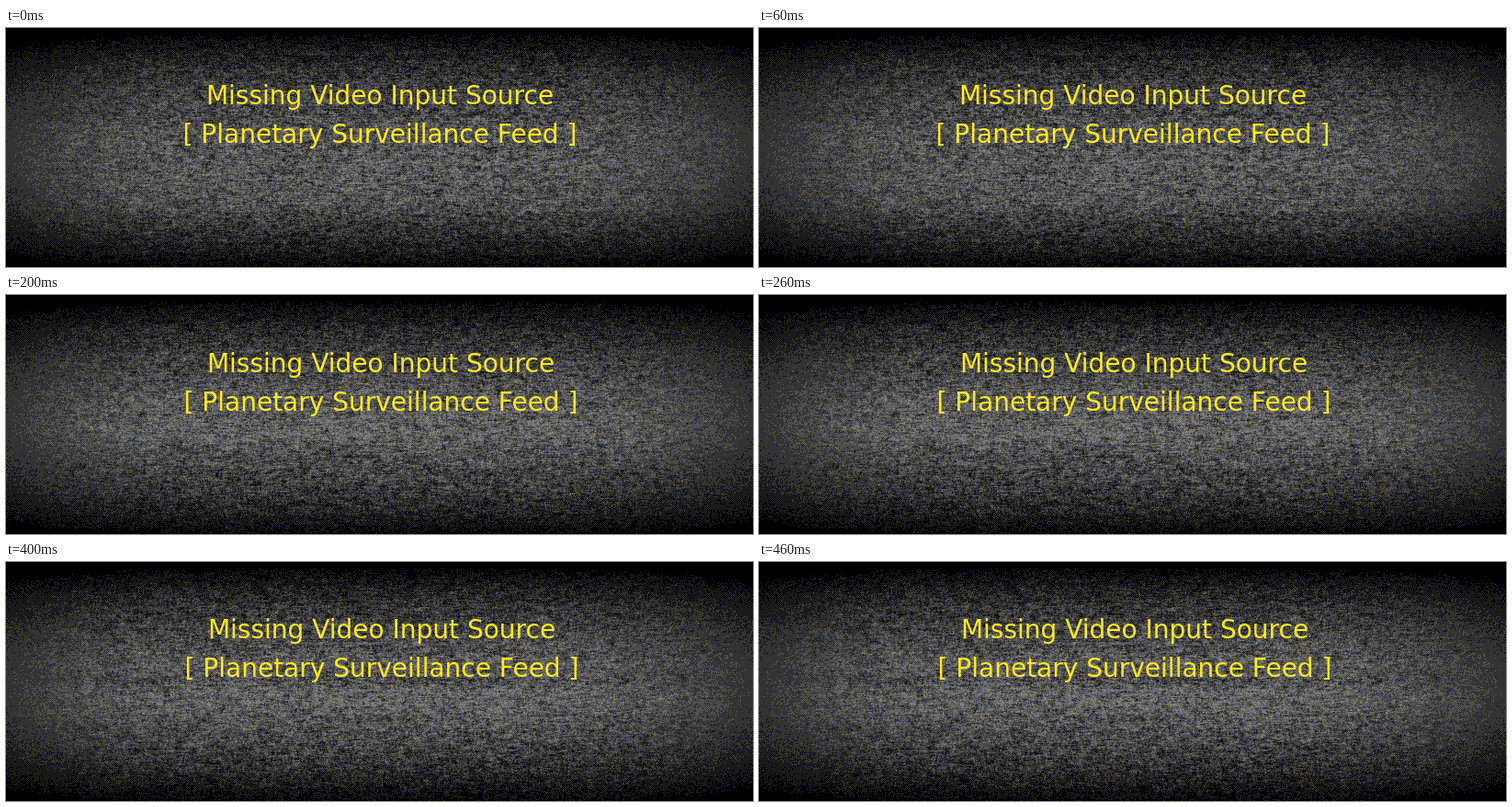
These frames come from a looping animation (813x260 px, 0.5 s). An HTML page with a canvas:

```html
<!DOCTYPE html>
<html lang="en">
<head>
<meta charset="utf-8">
<title>Missing Video Input Source</title>
<style>
  html, body { margin: 0; width: 100%; height: 100%; overflow: hidden; background: #000; }
  .stage { position: relative; width: 813px; height: 260px; overflow: hidden; }
  canvas { position: absolute; left: 0; top: 0; animation: roll .5s steps(5) infinite; }
  svg { position: absolute; left: 0; top: 0; animation: jitter .5s step-end infinite; }
  text {
    font: 400 28px "DejaVu Sans", sans-serif;
    text-anchor: middle;
    fill: #ffe91f;
  }
  @keyframes roll { to { transform: translateY(-100%); } }
  @keyframes jitter {
    0%   { transform: translate(0, 0); }
    20%  { transform: translate(-1px, 1px); }
    40%  { transform: translate(1px, 1px); }
    60%  { transform: translate(-1px, 0); }
    80%  { transform: translate(2px, 0); }
  }
</style>
</head>
<body>
<div class="stage">
  <canvas id="static" width="813" height="1300"></canvas>
  <svg width="813" height="260">
    <text x="407" y="83">Missing Video Input Source</text>
    <text x="407" y="125">[ Planetary Surveillance Feed ]</text>
  </svg>
</div>
<script>
const W = 813, H = 260, STEP = 51;
const ctx = document.getElementById('static').getContext('2d');

// Heights of the bright and the dark band in each picture
const bands = [
  { glow: 185, dim: 97 },
  { glow: 150, dim: 180 },
  { glow: 145, dim: 88 },
  { glow: 165, dim: 40 },
  { glow: 156, dim: 128 }
];

function seeded(seed) {
  return () => {
    seed = (seed + 0x6D2B79F5) | 0;
    let t = Math.imul(seed ^ (seed >>> 15), 1 | seed);
    t = (t + Math.imul(t ^ (t >>> 7), 61 | t)) ^ t;
    return ((t ^ (t >>> 14)) >>> 0) / 4294967296;
  };
}

const bump = (y, mid, width) => Math.exp(-(((y - mid) / width) ** 2));

// Television static: streaks along each row under a soft vignette
function drawStatic({ glow, dim }, index) {
  const rand = seeded(977 * (index + 1));
  const img = ctx.createImageData(W, H);
  const blots = new Float32Array(W);
  const level = (v, grain) => Math.floor(v / STEP + grain) * STEP;
  let row = 0, p = 0;

  for (let y = 0; y < H; y++) {
    const w2 = ((y - 134) / 128) ** 2;
    row = row * 0.75 + (rand() - 0.5) * 7;
    const band = row + 8 * bump(y, glow, 22) - 9 * bump(y, dim, 9);
    let streak = 0;

    for (let x = 0; x < W; x++) {
      const u4 = ((x - 406) / 406) ** 4;
      const shade = Math.max(0, 1 - w2 - 0.42 * u4 + 0.25 * w2 * u4);
      streak = streak * 0.66 + (rand() - 0.5) * 52;
      blots[x] = blots[x] * 0.4 + streak;
      const noise = (blots[x] + band) * (1 - u4) * Math.sqrt(shade);
      const v = Math.min(118, Math.max(0, 87 * shade + noise));
      const weave = ((x ^ y) & 1) / 2;
      img.data[p] = img.data[p + 1] = level(v, weave + rand() / 2);
      img.data[p + 2] = level(v, weave + rand() / 2);
      img.data[p + 3] = 255;
      p += 4;
    }
  }
  ctx.putImageData(img, 0, index * H);
}

bands.forEach(drawStatic);
</script>
</body>
</html>
```
